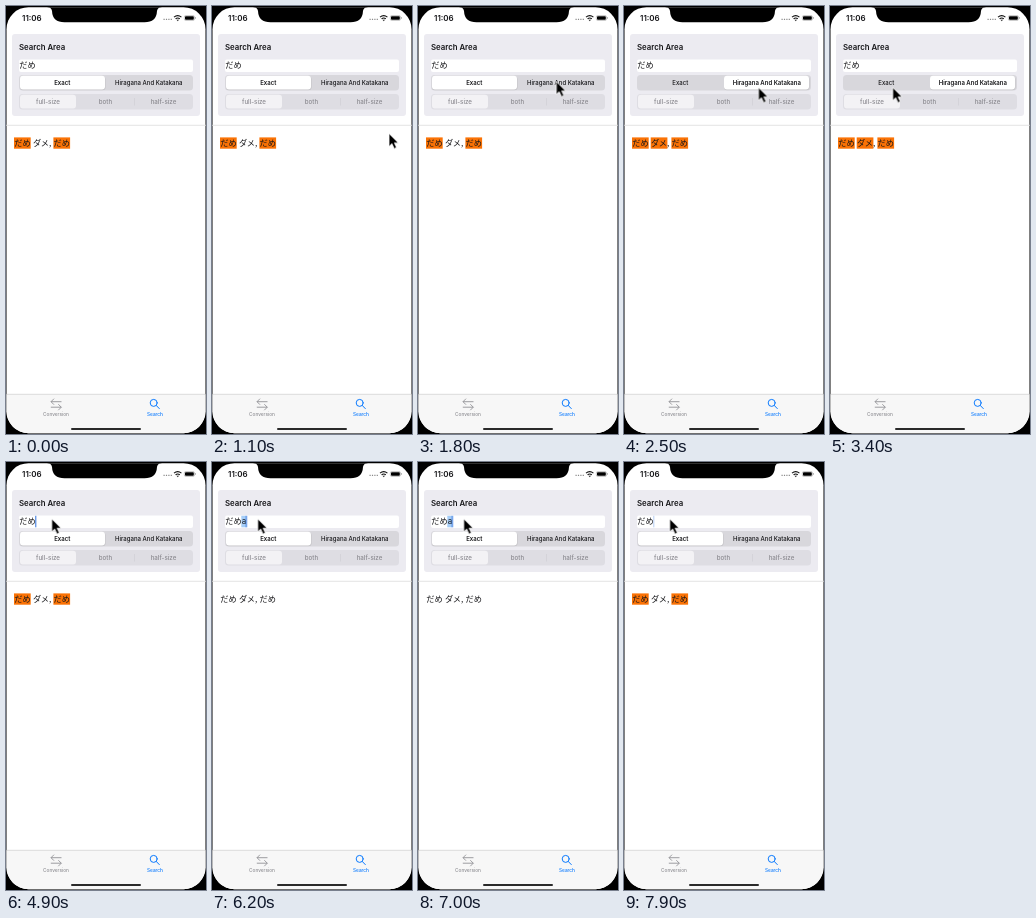
An HTML page for the animation above (8 s loop, 200x428 px).

```html
<!DOCTYPE html>
<html lang="ja">
<head>
<meta charset="utf-8">
<title>Kana search</title>
<style>
  html, body { margin: 0; width: 100%; height: 100%; overflow: hidden; background: #000; }
  svg { display: block; width: 200px; height: 428px; }
  text { font-family: Inter, "Liberation Sans", sans-serif; fill: #17171a; }
  .kana { font: 8.2px "Noto Sans CJK JP", "Noto Sans CJK", sans-serif; }
  .seg { font-size: 6px; font-weight: 500; text-anchor: middle; }
  .dim { font-size: 6.2px; fill: #8b8a90; }
  .tab { font-size: 4.75px; font-weight: 500; text-anchor: middle; fill: #8e8e93; }
  .tab.on { fill: #0a7aff; }
  .mark { fill: #fa7205; }

  .thumb, .first, .second, .exact, .fuzzy, .typed, .caret, .pointer {
    animation: 8s step-end -10ms infinite;
  }
  .thumb { animation-name: thumb; }
  .first { animation-name: first; }
  .second { animation-name: second; }
  .exact { animation-name: exact; }
  .fuzzy { animation-name: fuzzy; }
  .typed { animation-name: typed; }
  .caret { animation-name: caret; }
  .pointer { animation-name: pointer; }

  @keyframes thumb {
    0%, 46.25% { transform: translateX(0); }
    23.75% { transform: translateX(12px); }
    25% { transform: translateX(52px); }
    26.25% { transform: translateX(80px); }
    27.5% { transform: translateX(86px); }
    43.75% { transform: translateX(74px); }
    45% { transform: translateX(24px); }
  }
  @keyframes first {
    0%, 45% { font-weight: 600; }
    26.25% { font-weight: 500; }
  }
  @keyframes second {
    0%, 45% { font-weight: 500; }
    26.25% { font-weight: 600; }
  }
  @keyframes exact {
    0%, 91.25% { opacity: 1; }
    68.75% { opacity: 0; }
  }
  @keyframes fuzzy {
    0%, 45% { opacity: 0; }
    26.25% { opacity: 1; }
  }
  @keyframes typed {
    0%, 91.25% { opacity: 0; }
    68.75% { opacity: 1; }
  }
  @keyframes caret {
    0% { opacity: 0; transform: none; }
    61.25% { opacity: 1; transform: none; }
    68.75% { opacity: 1; transform: translateX(4.6px); }
    73.75% { opacity: .5; transform: translateX(4.6px); }
    75% { opacity: 0; transform: translateX(4.6px); }
    77.5% { opacity: 1; transform: translateX(4.6px); }
    82.5% { opacity: 0; transform: translateX(4.6px); }
    86.25% { opacity: .5; transform: translateX(4.6px); }
    87.5% { opacity: 1; transform: translateX(4.6px); }
    91.25% { opacity: 1; transform: none; }
    97.5% { opacity: .6; transform: none; }
    98.75%, 100% { opacity: .35; transform: none; }
  }
  /* Pointer travel, advancing ten times a second */
  @keyframes pointer {
    0% { transform: translate(220px, 150px); }
    11.25% { transform: translate(194px, 146px); animation-timing-function: steps(4); }
    16.25% { transform: translate(160px, 109px); }
    18.75% { transform: translate(156px, 101px); animation-timing-function: steps(3); }
    22.5% { transform: translate(138.3px, 75.5px); animation-timing-function: steps(4); }
    27.5% { transform: translate(135px, 81px); }
    31.25% { transform: translate(134.5px, 81.5px); animation-timing-function: steps(2); }
    33.75% { transform: translate(112px, 122px); animation-timing-function: steps(2); }
    36.25% { transform: translate(78px, 144px); animation-timing-function: steps(2); }
    38.75% { transform: translate(46px, 122px); animation-timing-function: steps(2); }
    41.25% { transform: translate(57px, 87px); }
    42.5% { transform: translate(62.7px, 81.5px); }
    47.5% { transform: translate(61.5px, 79px); animation-timing-function: steps(4); }
    52.5% { transform: translate(51px, 53px); }
    53.75% { transform: translate(49px, 53px); animation-timing-function: steps(2); }
    56.25%, 100% { transform: translate(45.7px, 56.8px); }
  }
</style>
</head>
<body>
<svg viewBox="0 0 200 428">
  <defs>
    <clipPath id="screen"><rect x=".5" y="1.200" width="199" height="426" rx="22"/></clipPath>
  </defs>
  <rect width="200" height="428"/>
  <g clip-path="url(#screen)">
    <rect width="200" height="428" fill="#fff"/>

    <!-- Status bar -->
    <path d="M41.500 0V1.200Q45.500 1.500 46 5Q46.500 16.300 58.500 16.300H138.500Q150.500 16.300 151 5Q151.500 1.500 155.500 1.200V0Z"/>
    <text x="16" y="15" font-size="8" font-weight="600">11:06</text>
    <path d="M157.500 13.300H166" stroke="#8a8a8a" stroke-width="1.200" stroke-dasharray="1.200 1.200"/>
    <g fill="none" stroke="#111" stroke-width="1.200">
      <path d="M168 11.100Q171.700 8.200 175.400 11.100M169.600 12.800Q171.700 11.200 173.800 12.800"/>
      <path d="M170.800 13.900L171.700 14.700L172.600 13.900Z" fill="#111" stroke-width=".4"/>
    </g>
    <rect x="178.300" y="9.500" width="10.200" height="5" rx="1.500" fill="none" stroke="#999" stroke-width=".5"/>
    <rect x="179" y="10.200" width="8.800" height="3.600" rx=".8"/>
    <rect x="189.100" y="11.100" width=".7" height="1.800" rx=".3" fill="#999"/>

    <!-- Search panel -->
    <rect x="6" y="28" width="188" height="82" rx="3" fill="#ecebf1"/>
    <text x="13" y="43.800" font-size="7.8" font-weight="600">Search Area</text>
    <rect x="13" y="53.500" width="174" height="12.500" rx="2" fill="#fff"/>
    <text class="kana" x="13.300" y="62.200">だめ</text>
    <g class="typed">
      <rect x="29.300" y="53.800" width="5.200" height="11.500" fill="#a6cdf7"/>
      <text x="29.700" y="62" font-size="8">a</text>
    </g>
    <rect class="caret" x="29.300" y="53.800" width="1" height="11.500" fill="#2f72df"/>

    <rect x="13" y="69" width="174" height="15.500" rx="3.500" fill="#d8d7dc"/>
    <g class="thumb">
      <rect x="14" y="70.300" width="85.500" height="14" rx="3" fill="#000" opacity=".1"/>
      <rect x="14" y="69.800" width="85" height="13.800" rx="3" fill="#fff"/>
    </g>
    <text class="seg first" x="56.300" y="79">Exact</text>
    <text class="seg second" x="142.800" y="79">Hiragana And Katakana</text>

    <rect x="13" y="88" width="174" height="15.500" rx="3.500" fill="#dedde3"/>
    <rect x="14" y="88.800" width="56" height="13.800" rx="3" fill="#f3f2f5"/>
    <path d="M128.500 92V99.500" stroke="#d0cfd5" stroke-width=".7"/>
    <text class="seg dim" x="42" y="97.800">full-size</text>
    <text class="seg dim" x="99.500" y="97.800">both</text>
    <text class="seg dim" x="157.500" y="97.800">half-size</text>

    <path d="M0 119.300H200" stroke="#dcdcde" stroke-width=".8"/>

    <!-- Result line -->
    <g class="mark">
      <g class="exact">
        <rect x="8" y="131.400" width="16.700" height="11.300"/>
        <rect x="47.400" y="131.400" width="16.700" height="11.300"/>
      </g>
      <rect class="fuzzy" x="26.700" y="131.400" width="16.700" height="11.300"/>
    </g>
    <g>
      <text class="kana" x="8.200" y="139.600">だめ</text>
      <text class="kana" x="26.900" y="139.600">ダメ,</text>
      <text class="kana" x="47.500" y="139.600">だめ</text>
    </g>

    <!-- Tab bar -->
    <rect y="388" width="200" height="40" fill="#f7f7f7"/>
    <path d="M0 388.300H200" stroke="#d2d2d2" stroke-width=".7"/>
    <path d="M55.500 395.700H45M48 392.700L45 395.700L48 398.700M44.800 401.200H55.300M52.300 398.200L55.300 401.200L52.300 404.200"
          fill="none" stroke="#8e8e93" stroke-width=".85"/>
    <g fill="none" stroke="#0a7aff" stroke-width="1" stroke-linecap="round">
      <circle cx="147.700" cy="396.900" r="3.500"/>
      <path d="M150.300 399.500L153.300 402.600"/>
    </g>
    <text class="tab" x="50" y="410">Conversion</text>
    <text class="tab on" x="149" y="410">Search</text>
    <rect x="65" y="421.900" width="70" height="2.100" rx="1" fill="#2a2a2a"/>
  </g>

  <path class="pointer" d="M0 0V13L3 10.300L5.200 15.200L7.600 14.100L5.400 9.400H9.500Z"
        fill="#000" stroke="#fff" stroke-width=".8" stroke-linejoin="round"/>
</svg>
</body>
</html>
```
